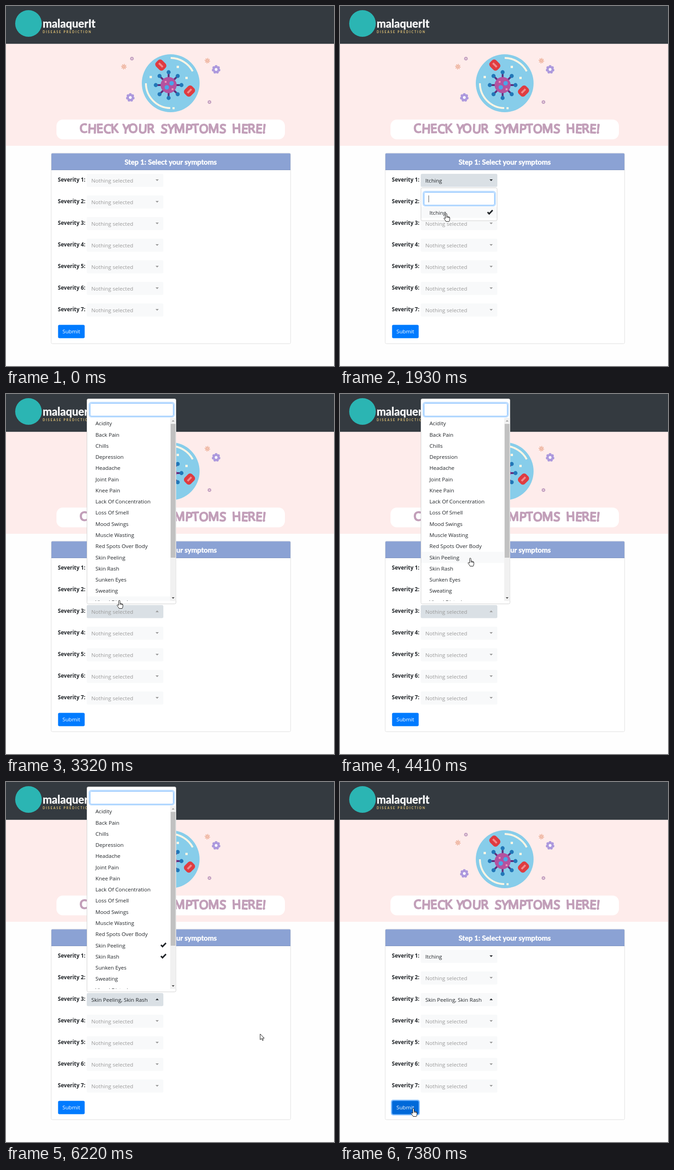
These frames come from a looping animation (715 by 783 pixels, 8000 ms). An HTML page:

```html
<!DOCTYPE html>
<html lang="en">
<head>
<meta charset="utf-8">
<title>Symptom checker</title>
<style>
  html, body { margin: 0; width: 100%; height: 100%; overflow: hidden; background: #fefefe; }
  svg { display: block; font: 11.63px "Open Sans", "Noto Sans", sans-serif; }
  .display { font-family: Lato, sans-serif; font-weight: 700; }
  .label { font-weight: 700; fill: #212529; }
  .lettering { font-size: 26.5px; fill: #c29fb9; stroke: #c29fb9; stroke-width: 2.4; stroke-linejoin: round; }
</style>
</head>
<body>
<svg width="715" height="783" viewBox="0 0 715 783">
  <rect width="715" height="82.5" fill="#343a40"/>
  <circle cx="49" cy="38" r="29" fill="#2bb5b3"/>
  <g class="display">
    <text x="80" y="47" font-size="24" fill="#fff" stroke="#fff" stroke-width=".5">malaquerIt</text>
    <text x="80" y="59" font-size="6.5" letter-spacing="2.25" fill="#e9c877">DISEASE PREDICTION</text>
  </g>

  <rect y="82.5" width="715" height="221.5" fill="#feeceb"/>
  <g id="art"></g>
  <rect x="110" y="247" width="498" height="43" rx="14" fill="#fff"/>
  <text class="lettering" y="276">
    <tspan x="161" rotate="-4 2 -2 3 -3">CHECK</tspan>
    <tspan x="253" rotate="5 -3 3 -2">YOUR</tspan>
    <tspan x="337" rotate="4 5 -2 3 -3 2 -2 3">SYMPTOMS</tspan>
    <tspan x="493" rotate="-2 3 -3 2 5">HERE!</tspan>
  </text>

  <rect x="98.5" y="320" width="522" height="414.5" rx="3" fill="#fff" stroke="#dfdfdf"/>
  <path d="M99 357V322.5q0-2 2-2H618q2 0 2 2V357Z" fill="#8ba2d4"/>
  <path d="M99 356.5H620" stroke="#7c91be"/>
  <text class="display" x="359" y="344.5" font-size="15.4" text-anchor="middle" fill="#fff" stroke="#fff" stroke-width=".5">Step 1: Select your symptoms</text>
  <g id="live"></g>
  <clipPath id="list"><rect x="177" y="52" width="181" height="398"/></clipPath>
</svg>

<script>
const LOOP = 8000, OPTION_H = 24.27, LIST_TOP = 52;
const OPEN_1 = 930, PICK_ITCHING = 1780, OPEN_3 = 2790, PICK_PEELING = 5230,
      PICK_RASH = 5650, CLOSE_3 = 6320, SUBMIT = 7340;
const FOCUS_TIMES = [OPEN_1, PICK_ITCHING, OPEN_3, PICK_PEELING, PICK_RASH];
const PRESSES = [[770, OPEN_1], [1640, PICK_ITCHING], [2640, OPEN_3], [5110, 5200],
                 [5560, PICK_RASH], [6240, CLOSE_3], [7230, SUBMIT]];
const SYMPTOMS = ["Acidity", "Back Pain", "Chills", "Depression", "Headache", "Joint Pain",
  "Knee Pain", "Lack Of Concentration", "Loss Of Smell", "Mood Swings", "Muscle Wasting",
  "Red Spots Over Body", "Skin Peeling", "Skin Rash", "Sunken Eyes", "Sweating", "Visual Disturbances"];

// Pointer stops: time, x, y
const STOPS = [[120, 622, 711], [760, 290, 367], [930, 290, 367], [1290, 293, 398],
  [1600, 230, 449], [1800, 230, 449], [2500, 246, 473], [3160, 246, 473], [3320, 247, 449],
  [3850, 278, 372], [4180, 278, 372], [4410, 284, 357], [4790, 284, 357], [4950, 279, 356],
  [5270, 279, 356], [5530, 279, 380], [5910, 279, 380], [6220, 554, 548], [6320, 554, 548],
  [6750, 184, 741], [6830, 184, 739], [7200, 160, 710], [LOOP, 160, 710]];

const clamp = v => Math.max(0, Math.min(1, v));
const repeat = (n, fn) => Array.from({ length: n }, (_, i) => fn(i)).join("");
const rect = (x, y, w, h, attrs) => `<rect x="${x}" y="${y}" width="${w}" height="${h}" ${attrs}/>`;
const circle = (x, y, r, fill) => `<circle cx="${x}" cy="${y}" r="${r}" fill="${fill}"/>`;
const path = (d, attrs) => `<path d="${d}" ${attrs}/>`;
const text = (x, y, str, attrs = 'fill="#212529"') => `<text x="${x}" y="${y}" ${attrs}>${str}</text>`;

function flower(x, y, r, color, core) {
  return repeat(7, i => circle(x + r * .68 * Math.sin(i * Math.PI / 3.5),
    y - r * .68 * Math.cos(i * Math.PI / 3.5), r * .33, color)) +
    circle(x, y, r * .7, color) + circle(x, y, r * .32, core);
}

function star(x, y) {
  return repeat(8, i => path("M0 1.8V5.2",
    `transform="translate(${x} ${y}) rotate(${i * 45 + 10})" stroke="#eeb39d" stroke-width="2" stroke-linecap="round"`));
}

function bloodCell(x, y, angle) {
  return `<g transform="translate(${x} ${y}) rotate(${angle})">` +
    rect(-11.5, -9.5, 23, 19, 'rx="6.5" fill="#df3c41"') + rect(-6, -2, 12, 4, 'fill="#f08c8f"') + "</g>";
}

function illustration() {
  const cream = 'fill="#fdf5e4"';
  const spike = i => `<g transform="translate(354.5 172) rotate(${i * 45})">` +
    path("M0 0V-25", 'stroke="#5f2f7d" stroke-width="4"') + circle(0, -28, 4.4, "#2277b8") + "</g>";
  return circle(359, 168, 63, "#87cdea") +
    path("M359 113A55 55 0 0 1 407 142M305 168A54 54 0 0 0 358 222", 'fill="none" stroke="#fdf5e4" stroke-width="4"') +
    rect(363, 220, 4.5, 4.5, cream) + rect(313, 152, 5, 5, cream) +
    rect(372, 130, 5, 5, cream) + rect(391, 154, 5, 5, cream) +
    repeat(8, spike) + circle(354.5, 172, 17.5, "#b4529f") +
    circle(361, 168, 4.8, "#4aa5e8") + circle(350.5, 177, 4.8, "#4aa5e8") +
    rect(346, 163, 4, 4, 'fill="#ec8fb8"') + rect(361, 179, 4, 4, 'fill="#ec8fb8"') +
    bloodCell(337.5, 128.5, 45) + bloodCell(400, 185, -45) +
    flower(458, 138, 9.3, "#ad99dd", "#fff") + flower(271, 199, 9.3, "#ad99dd", "#fff") +
    flower(274.5, 114.5, 4.2, "#c29fc0", "#feeceb") + flower(443.5, 209, 4.2, "#c29fc0", "#feeceb") +
    star(257, 132) + star(439, 119);
}

function pointerAt(t) {
  const next = STOPS.findIndex(s => s[0] > t);
  if (next < 1) return null;
  const [t0, x0, y0] = STOPS[next - 1], [t1, x1, y1] = STOPS[next];
  const p = (t - t0) / (t1 - t0), e = p * p * (3 - 2 * p);
  return { x: x0 + (x1 - x0) * e, y: y0 + (y1 - y0) * e };
}

// What lies under the pointer, given the open menu
function hoverAt(p, menu) {
  const hit = { row: 0, option: -1, submit: false };
  if (!p) return hit;
  const inside = (x, y, w, h) => p.x >= x && p.x < x + w && p.y >= y && p.y < y + h;
  if (menu === 1 && inside(176, 395, 167, 72)) {
    if (inside(176, 437, 167, 24)) hit.option = 0;
  } else if (menu === 3 && inside(176, 10, 195, 447)) {
    if (inside(176, LIST_TOP, 182, 398)) hit.option = Math.floor((p.y - LIST_TOP) / OPTION_H);
  } else {
    for (let i = 1; i <= 7; i++) if (inside(176, 318 + 47 * i, 167, 28)) hit.row = i;
    hit.submit = inside(114, 694, 57, 28);
  }
  return hit;
}

function mixText(k) {
  const [r, g, b] = [33, 37, 41].map(v => Math.round(153 + (v - 153) * k));
  return `rgb(${r},${g},${b})`;
}

function row(i, t, menu, hover, pressed) {
  const y = 318 + 47 * i;
  let value = "Nothing selected", picked = Infinity;
  if (i === 1 && t >= PICK_ITCHING) [value, picked] = ["Itching", PICK_ITCHING];
  if (i === 3 && t >= PICK_PEELING) [value, picked] = ["Skin Peeling", PICK_PEELING];
  if (i === 3 && t >= PICK_RASH) value += ", Skin Rash";
  const color = mixText(clamp((t - picked) / 150));
  const bg = menu === i ? "#dae0e5" : hover.row === i ? "#e2e6ea" : "#f8f9fa";
  const caret = i === 3 && t >= OPEN_3 ? `M326 ${y + 15.5}h7l-3.5 -3.7z` : `M326 ${y + 12}h7l-3.5 3.7z`;
  return text(113, y + 16.6, `Severity ${i}:`, 'class="label"') +
    rect(176, y, 167, 28.5, `rx="3" fill="${bg}"`) +
    (pressed && hover.row === i ? rect(178, y + 1, 162.5, 26, 'rx="2.5" fill="none" stroke="#101010" stroke-width="2"') : "") +
    text(186, y + 18.5, value, `fill="${color}"`) + path(caret, `fill="${color}"`);
}

function searchBox(x, y, w, t) {
  const age = t - FOCUS_TIMES.filter(f => f <= t).pop();
  const caretOn = Math.floor(age / 530) % 2 === 0;
  return rect(x - 1.5, y - 1.5, w + 3, 31, `rx="4.5" fill="none" stroke="#bfdeff" stroke-width="3" opacity="${clamp(age / 150)}"`) +
    rect(x + .5, y + .5, w - 1, 27.5, 'rx="3" fill="#fff" stroke="#80bdff"') +
    (caretOn ? path(`M193.5 ${y + 7}v15`, 'stroke="#495057"') : "");
}

const panel = (y, w, h) => rect(176.5, y, w, h, 'rx="3" fill="#fff" stroke="#d0d0d0"');
const tick = (x, y) => path(`M${x - 5.3} ${y + .4}l3.5 3.5l7.5 -7.8`, 'fill="none" stroke="#212529" stroke-width="3.2"');

function firstMenu(t, hover) {
  return panel(395.5, 166, 71.5) + searchBox(183, 405, 154, t) +
    (hover.option === 0 ? rect(177, 437, 165, 24, 'fill="#f8f9fa"') : "") +
    text(195, 453.5, "Itching") + (t >= PICK_ITCHING ? tick(327, 448) : "");
}

function thirdMenu(t, hover) {
  const option = (name, i) => {
    const mid = 64 + OPTION_H * i;
    const chosen = (i === 12 && t >= PICK_PEELING) || (i === 13 && t >= PICK_RASH);
    return (hover.option === i ? rect(177, mid - 12, 181, OPTION_H, 'fill="#f8f9fa"') : "") +
      text(195, mid + 4.3, name) + (chosen ? tick(343, mid - 1.2) : "");
  };
  return panel(10.5, 194, 446) + searchBox(183, 20, 182, t) +
    `<g clip-path="url(#list)">${SYMPTOMS.map(option).join("")}</g>` +
    rect(358, 52, 12.5, 398, 'fill="#f1f1f1"') + rect(359, 65, 10.5, 291, 'fill="#c1c1c1"') +
    path("M361.3 60h6l-3-3.5z", 'fill="#a3a3a3"') + path("M361.3 442h6l-3 3.5z", 'fill="#505050"');
}

function submitButton(t, hover) {
  return (t >= SUBMIT ? rect(111, 691, 63, 34, 'rx="5" fill="#80bdff"') : "") +
    rect(113.5, 693.5, 58, 29, `rx="3" fill="${hover.submit ? "#0069d9" : "#007bff"}"`) +
    text(123, 712.3, "Submit", 'fill="#fff"');
}

function pointer(p, hover, pressed) {
  if (!p) return "";
  const hand = hover.row || hover.submit || hover.option >= 0;
  const shape = hand
    ? path("M-1.5 11V1.5Q-1.5 0 0 0T1.5 1.5V6.5Q3.3 5.6 3.9 7Q5.4 6.2 6 7.8Q7.8 7.4 7.8 9.5V12.5Q7.8 15 6.3 17.5H-.5Q-2 14.5-4.6 11.4Q-5.4 9.6-3.6 9.4Q-2.4 9.5-1.5 11ZM1.5 6.5V9.5M3.9 7V9.8M6 7.8V10", 'fill="#fff" stroke="#111"')
    : path("M0 0V12.5L3 9.8L5 14.2L7 13.3L5.1 9.2H9Z", 'fill="#fff" stroke="#111"');
  return `<g transform="translate(${p.x} ${p.y})">` +
    (pressed ? `<circle cy="2.5" r="9" fill="#e8e336" opacity=".85"/>` : "") + shape + "</g>";
}

const live = document.getElementById("live");
document.getElementById("art").innerHTML = illustration();

function draw(now) {
  const t = now % LOOP;
  const menu = t < OPEN_1 ? 0 : t < OPEN_3 ? 1 : t < CLOSE_3 ? 3 : 0;
  const p = pointerAt(t), hover = hoverAt(p, menu);
  const pressed = PRESSES.some(([from, to]) => t >= from && t < to);
  live.innerHTML = repeat(7, i => row(i + 1, t, menu, hover, pressed)) + submitButton(t, hover) +
    (menu === 1 ? firstMenu(t, hover) : menu === 3 ? thirdMenu(t, hover) : "") +
    pointer(p, hover, pressed);
  requestAnimationFrame(draw);
}
draw(performance.now());
</script>
</body>
</html>
```
